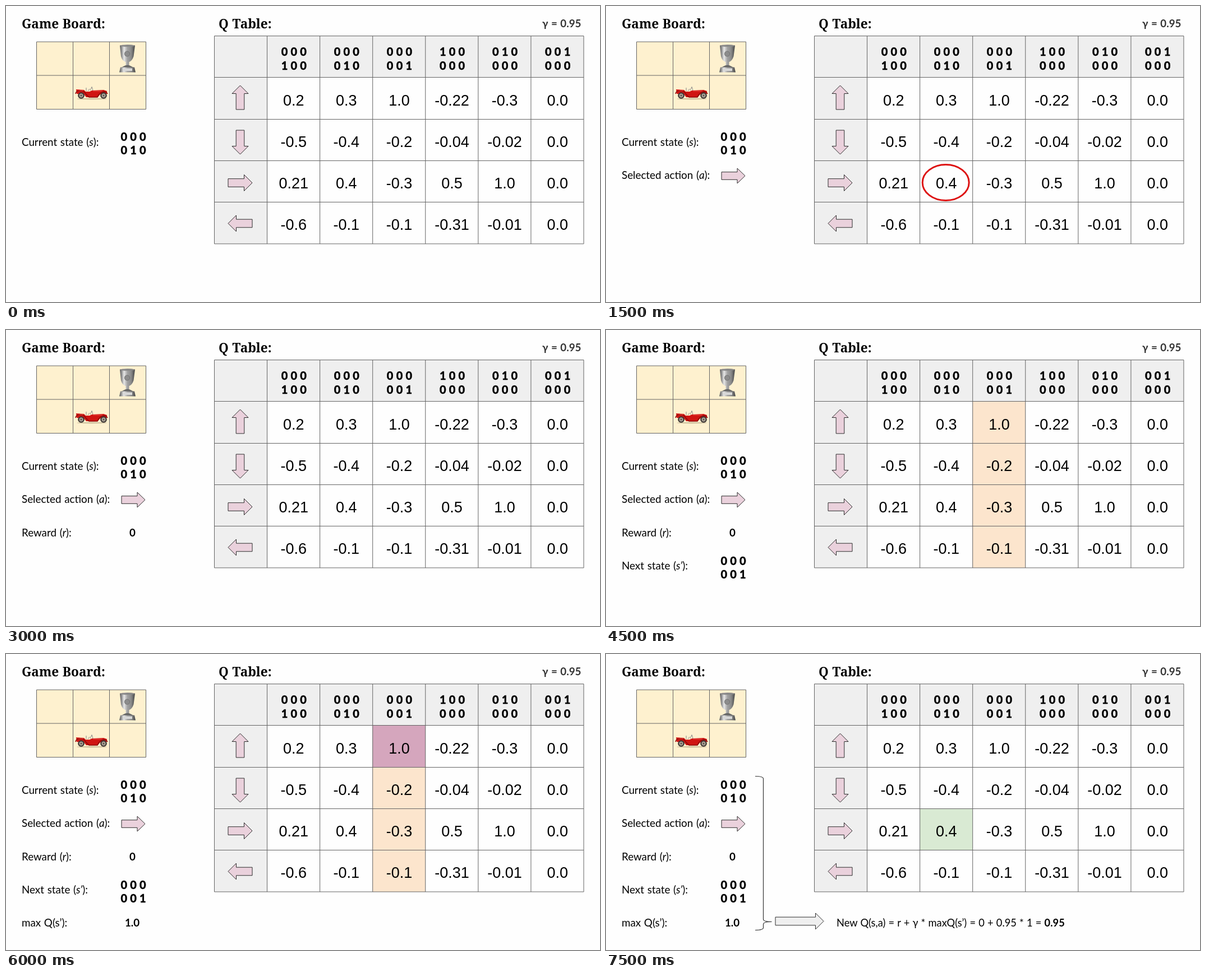
Animation, 1059 px wide and 529 px high, one loop 8 s. Source, as an HTML page:

```html
<!DOCTYPE html>
<html lang="en">
<head>
<meta charset="utf-8">
<title>Q-learning update</title>
<style>
html, body { margin: 0; width: 100%; height: 100%; overflow: hidden; background: #fefefe; }
svg { display: block; width: 1059px; height: 529px; }
text { font: 18.8px Lato, "Open Sans", sans-serif; fill: #000; word-spacing: .9px; white-space: pre; }
.title { font: bold 22.6px "Noto Serif", serif; }
.bold { font-weight: bold; }
.digit { font-weight: 800; font-size: 20px; text-anchor: middle; stroke: #000; stroke-width: .35; }
.value { font: 27px "Liberation Sans", Arial, sans-serif; text-anchor: middle; }
.rule { font-size: 18.3px; word-spacing: .5px; }
.mid { text-anchor: middle; }
.it { font-style: italic; }
.line { fill: none; stroke: #646464; stroke-width: 1; }
.arrow { stroke: #2c2c2c; stroke-width: 1; }
</style>
</head>
<body>
<svg id="stage" viewBox="0 0 1059 529">
  <defs>
    <linearGradient id="silver">
      <stop offset="0" stop-color="#555"/><stop offset=".28" stop-color="#e6e6e6"/>
      <stop offset=".5" stop-color="#a2a2a2"/><stop offset=".75" stop-color="#8a8a8a"/>
      <stop offset="1" stop-color="#444"/>
    </linearGradient>
  </defs>
</svg>
<script>
const stage = document.getElementById('stage');
const STEP = 1500, LOOP = 8000;
const timed = [];

function add(tag, attrs, content = '') {
  const el = document.createElementNS('http://www.w3.org/2000/svg', tag);
  for (const key in attrs) el.setAttribute(key, attrs[key]);
  el.innerHTML = content;
  stage.append(el);
  return el;
}
const rect = (x, y, width, height, fill) => add('rect', { x, y, width, height, fill });
const path = (d, attrs) => add('path', { d, ...attrs });
const text = (x, y, content, cls = '') => add('text', { x, y, class: cls }, content);

// Show the elements from step `from` up to and including step `to`.
function during(from, to, ...els) {
  els.forEach(el => timed.push({ el, from, to }));
}

function grid(xs, ys) {
  const [x0, x1, y0, y1] = [xs[0], xs.at(-1), ys[0], ys.at(-1)];
  path(xs.map(x => `M${x} ${y0}V${y1}`).join('') + ys.map(y => `M${x0} ${y}H${x1}`).join(''), { class: 'line' });
}

// Block arrow centred on (x, y), pointing right before rotation.
function arrow(x, y, angle, length, fill, head = 14.5, half = 14.5, shaft = 7.3) {
  const e = length / 2, n = e - head;
  return path(`M${-e} ${-shaft}H${n}V${-half}L${e} 0L${n} ${half}V${shaft}H${-e}Z`,
    { class: 'arrow', fill, transform: `translate(${x} ${y}) rotate(${angle})` });
}

function state(x, y, rows) {
  const xs = [x - 16.8, x, x + 16.8].join(' ');
  return rows.split('/').map((row, i) => text(xs, y + i * 24.4, row, 'digit'));
}

function trophy() {
  const fill = 'url(#silver)';
  path('M203 70.5Q216.5 67.5 230 70.5L227.5 90Q225 98 219.5 100V107H213.5V100Q207 98 205 90Z', { fill });
  add('ellipse', { cx: 216.5, cy: 71, rx: 13, ry: 1.8, fill: '#888' });
  add('circle', { cx: 216, cy: 85.5, r: 4.6, fill: '#8c8c8c', stroke: '#6a6a6a', 'stroke-width': .8 });
  path('M209 108Q216.5 103 224 108L228 110.5H205Z', { fill: '#666' });
  path('M204 109.5H229L231 118.5H202Z', { fill });
  rect(208, 111.5, 17, 4.5, '#d8d8d8');
}

function car() {
  add('ellipse', { cx: 153, cy: 166, rx: 27, ry: 1.2, fill: '#cdbf9c' });
  path('M125 149L139 150L142 153H149L153 151L174 150L180 152V157L168 158L163 163H143L139 158L126 157Z', { fill: '#d01512' });
  path('M124 157Q125 151 132 151Q139 151 143 158L148 163H163Q167 154 174 153Q179 153 181 157', { fill: 'none', stroke: '#8c0a0a', 'stroke-width': 1.6 });
  path('M127 149.5L138 151.5M155 152H172', { stroke: '#ee4a42', 'stroke-width': 1.2 });
  path('M143 152V146M150 151L153 144.5L155 151M146 152L149 148', { fill: 'none', stroke: '#888', 'stroke-width': 1 });
  for (const x of [134, 174]) {
    add('circle', { cx: x, cy: 160, r: 5.8, fill: '#383230' });
    add('circle', { cx: x, cy: 160, r: 3.7, fill: '#a59c90' });
    add('circle', { cx: x, cy: 160, r: 1.2, fill: '#4a4542' });
  }
}

const PINK = '#ead1dc', GRAY = '#efefef', PEACH = '#fce5cd';
const COL = 94.07;
const cols = Array.from({ length: 8 }, (_, i) => 371.5 + i * COL);
const rows = [53.5, 127.5, 202.5, 276.5, 350.5, 425];
const states = ['000/100', '000/010', '000/001', '100/000', '010/000', '001/000'];
const table = [
  '0.2 0.3 1.0 -0.22 -0.3 0.0',
  '-0.5 -0.4 -0.2 -0.04 -0.02 0.0',
  '0.21 0.4 -0.3 0.5 1.0 0.0',
  '-0.6 -0.1 -0.1 -0.31 -0.01 0.0'
];
const cell = (c, r, fill, span = 1) =>
  rect(cols[c], rows[r], COL, rows[r + span] - rows[r], fill);

// Game board
text(28, 40, 'Game Board:', 'title');
rect(54.5, 64, 195, 120.5, '#fef1cf');
grid([54.5, 119.5, 184.5, 249.5], [64, 124, 184.5]);
trophy();
car();

// Q table
text(379, 40, 'Q Table:', 'title');
text(956, 38, 'γ = 0.95', 'bold').style.fill = '#333';
rect(371.5, 53.5, 658.5, 74, GRAY);
cell(0, 1, GRAY, 4);
during(3, 4, cell(3, 1, PEACH, 4));
during(4, 4, cell(3, 1, '#d5a6bd'));
during(5, 5, cell(2, 3, '#d9ead3'));
grid(cols, rows);
[[163.5, -90], [243.5, 90], [316, 0], [388.5, 180]].forEach(([y, angle]) => arrow(417.5, y, angle, 43, PINK));
states.forEach((s, i) => state(513.3 + i * COL, 89.2, s));
table.forEach((row, r) => row.split(' ').forEach((v, c) =>
  text(512.8 + c * COL, 177.5 + r * 74.3, v, 'value')));
during(1, 1, add('ellipse', { cx: 605.7, cy: 315.5, rx: 41.5, ry: 32, fill: 'none', stroke: '#dd1111', 'stroke-width': 3 }));

// Step list
const it = s => `<tspan class="it">${s}</tspan>`;
text(28, 249.5, `Current state (${it('s')}):`);
state(227, 241, '000/010');
during(1, 5, text(28, 309, `Selected action (${it('a')}):`), arrow(227, 303.5, 0, 42, PINK, 14, 13.5, 6.8));
during(2, 5, text(28, 368.5, `Reward (${it('r')}):`), text(225.5, 368.5, '0', 'bold mid'));
during(3, 5, text(28, 428, `Next state (${it('s’')}):`), ...state(227, 419.5, '000/001'));
during(4, 5, text(28, 487, 'max Q(s’):'), text(225, 487, '1.0', 'bold mid'));

// Update rule
during(5, 5,
  path('M266 218.5Q280.5 218.5 280.5 223V474Q280.5 478.5 295.5 478.5Q280.5 478.5 280.5 483V489Q280.5 493.5 266 493.5',
    { fill: 'none', stroke: '#333', 'stroke-width': 1.2 }),
  arrow(345, 477.5, 0, 86, GRAY),
  text(411, 487, 'New Q(s,a) = r + γ * maxQ(s’) = 0 + 0.95 * 1 = <tspan class="bold">0.95</tspan>', 'rule'));

const start = performance.now();
function draw(now) {
  const step = Math.floor((Math.max(0, now - start) % LOOP) / STEP);
  for (const { el, from, to } of timed)
    el.style.visibility = step >= from && step <= to ? 'visible' : 'hidden';
  requestAnimationFrame(draw);
}
draw(start);
</script>
</body>
</html>
```
